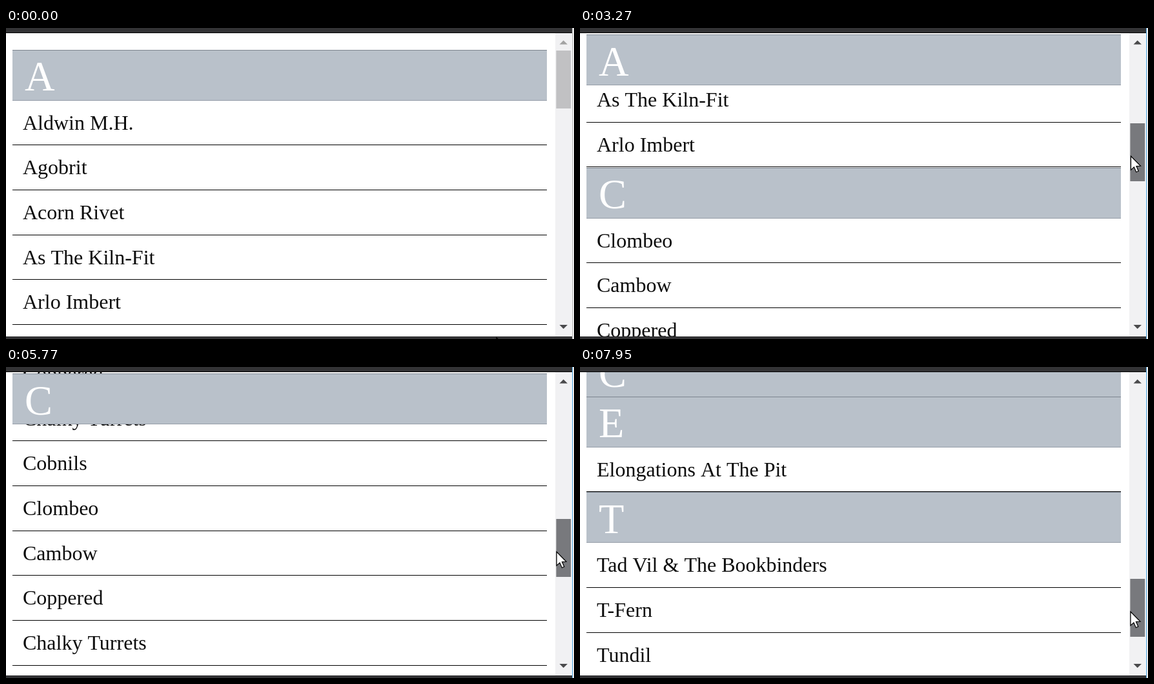
These frames come from a looping animation (880x483 px, 8000 ms). An HTML page with a canvas:

```html
<!DOCTYPE html>
<html lang="en">
<head>
<meta charset="utf-8">
<title>Sticky list headers</title>
<style>
  html, body { margin: 0; width: 100%; height: 100%; overflow: hidden; background: #fff; }
  canvas { display: block; }
</style>
</head>
<body>
<canvas id="stage" width="880" height="483"></canvas>
<script>
const ctx = document.getElementById('stage').getContext('2d');

const LOOP = 8000, TICK = 77.93;   // the picture updates once per tick
const LEFT = 10, WIDTH = 828, HEADER = 78, ROW = 69.67, STUCK_TOP = 10.5;
const VIEW_TOP = 8, VIEW_BOTTOM = 479;
const THUMB_TOP = 35, THUMB_HEIGHT = 90, SCROLL_PER_THUMB_PX = 5.235;
const ARRIVE_TICK = 6, PRESS_TICK = 12, DRAG_TICK = 14;

const aNames = ['Aldwin M.H.', 'Agobrit', 'Acorn Rivet', 'As The Kiln-Fit', 'Arlo Imbert'];
const cNames = ['Clombeo', 'Cambow', 'Coppered', 'Chalky Turrets', 'Cobnils'];
const sections = [
  { letter: 'A', names: [...aNames, ...aNames] },
  { letter: 'C', names: [...cNames, ...cNames] },
  { letter: 'E', names: ['Elongations At The Pit'] },
  { letter: 'T', names: ['Tad Vil & The Bookbinders', 'T-Fern', 'Tundil'] }
];
let nextTop = 34;
for (const section of sections) {
  section.top = nextTop;
  nextTop += HEADER + section.names.length * ROW + 1;
}

const steady = p => p;
const easeIn = p => p * p;
const hesitate = p => p + 0.9 * Math.sin(2 * Math.PI * p) / (2 * Math.PI);

// Strokes of the drag: each ends at a tick and a scroll position.
const strokes = [
  { tick: 29, scroll: 348.4, ease: easeIn },
  { tick: 42, scroll: 592.7, ease: steady },
  { tick: 66, scroll: 860.5, ease: hesitate },
  { tick: 81, scroll: 1219, ease: steady },
  { tick: 90, scroll: 1372.4, ease: hesitate },
  { tick: 102, scroll: 1539.4, ease: steady }
];

function scrollAt(tick) {
  let from = { tick: DRAG_TICK, scroll: 0 };
  if (tick <= from.tick) return 0;
  for (const to of strokes) {
    if (tick <= to.tick) {
      const p = (tick - from.tick) / (to.tick - from.tick);
      return from.scroll + (to.scroll - from.scroll) * to.ease(p);
    }
    from = to;
  }
  return from.scroll;
}

function cursorAt(tick, thumbTop) {
  if (tick <= DRAG_TICK) {
    const p = Math.min(1, tick / ARRIVE_TICK);
    return { x: 760 + 101 * p, y: 481 - 395 * p };
  }
  return { x: 853 + 8 * Math.exp((DRAG_TICK - tick) / 10), y: thumbTop + 51 };
}

function rect(color, x, y, w, h) {
  ctx.fillStyle = color;
  ctx.fillRect(x, y, w, h);
}

function text(string, size, color, x, y) {
  ctx.font = `${size}px "Liberation Serif", serif`;
  ctx.fillStyle = color;
  ctx.fillText(string, x, Math.round(y));
}

function polygon(points) {
  ctx.beginPath();
  points.forEach(([x, y]) => ctx.lineTo(x, y));
  ctx.closePath();
  ctx.fill();
}

function arrow(color, baseY, tipY) {
  ctx.fillStyle = color;
  polygon([[857.5, baseY], [870, baseY], [863.7, tipY]]);
}

function drawRows({ top, names }, scroll) {
  names.forEach((name, i) => {
    const y = top + HEADER + i * ROW - scroll;
    text(name, 32, '#0c0c0c', 26, y + 45.6);
    rect('#000', LEFT, Math.floor(y + ROW), WIDTH, 1);
  });
}

function drawHeader({ letter, top }, following, scroll) {
  const limit = following ? following.top - scroll - HEADER : Infinity;
  const exactY = Math.max(top - scroll, Math.min(STUCK_TOP, limit));
  const y = Math.floor(exactY);
  rect('#b9c1ca', LEFT, y, WIDTH, HEADER);
  rect('#7d858f', LEFT, y, WIDTH, 1);
  rect('#959da8', LEFT, y + HEADER, WIDTH, 1);
  text(letter, 64.5, '#fff', 29, exactY + 63);
}

function drawScrollbar(scroll, thumbTop, thumbColor) {
  rect('#f1f1f3', 851, VIEW_TOP, 25, VIEW_BOTTOM - VIEW_TOP);
  rect(thumbColor, 852.4, thumbTop, 22.8, THUMB_HEIGHT);
  arrow(scroll > 0 ? '#4a4a4c' : '#a3a3a3', 25.5, 19.3);
  arrow('#4a4a4c', 461, 467.3);
}

function drawWindowFrame(pressed) {
  rect('#333335', 0, 0, 877, VIEW_TOP);
  rect('#000', 0, VIEW_TOP - 1, 877, 1);
  rect('#333335', 0, VIEW_BOTTOM, 877, 483 - VIEW_BOTTOM);
  rect(pressed ? '#45a0dc' : '#b4b4b4', 877, 0, 1, 483);
  rect('#ececec', 878, 0, 2, 483);
}

function drawCursor({ x, y }) {
  ctx.save();
  ctx.translate(x, y);
  ctx.fillStyle = '#fff';
  ctx.strokeStyle = '#000';
  ctx.lineWidth = 1.2;
  polygon([[0, 0], [0, 21.5], [4.9, 17], [8.3, 24.7], [11.8, 23.2], [8.5, 15.6], [15, 15.3]]);
  ctx.stroke();
  ctx.restore();
}

function draw(now) {
  const tick = Math.floor((now % LOOP + 5) / TICK);
  const scroll = scrollAt(tick);
  const thumbTop = Math.round(THUMB_TOP + scroll / SCROLL_PER_THUMB_PX);
  const pressed = tick >= PRESS_TICK;
  const hovered = tick >= ARRIVE_TICK;

  rect('#fff', 0, 0, 880, 483);
  sections.forEach(section => drawRows(section, scroll));
  sections.forEach((section, i) => drawHeader(section, sections[i + 1], scroll));
  drawScrollbar(scroll, thumbTop, pressed ? '#78797d' : hovered ? '#a8a8a8' : '#c1c1c3');
  drawWindowFrame(pressed);
  drawCursor(cursorAt(tick, thumbTop));
}

const start = performance.now();
function loop() {
  draw(performance.now() - start);
  requestAnimationFrame(loop);
}
loop();
</script>
</body>
</html>
```
